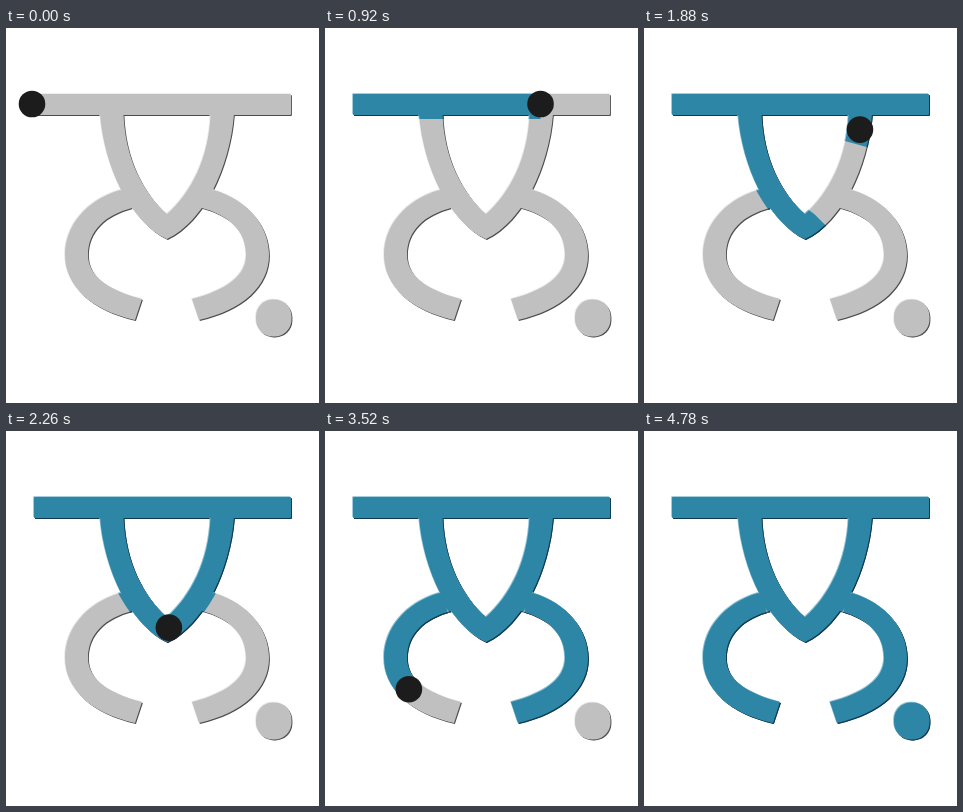
Animation, 313 px wide and 375 px high, one loop 4800 ms. Source, as an HTML page with a canvas:

```html
<!DOCTYPE html>
<html lang="en">
<head>
<meta charset="utf-8">
<title>Letter stroke order</title>
<style>
html, body { margin: 0; width: 100%; height: 100%; overflow: hidden; background: #fff; }
canvas { display: block; }
</style>
</head>
<body>
<canvas id="stage" width="313" height="375"></canvas>
<script>
const W = 313, H = 375, LOOP = 4800, STEP = 20;
const ctx = document.getElementById('stage').getContext('2d');

// The letter is symmetric about x = 161.
const mirror = d => d.replace(/([\d.]+),/g, (_, x) => (322 - x) + ',');

const stem = 'M94,86 C96,113 104,140 115,162 C126,183 143,203 161,211 L166,197 L161,186 C137,165 119,130 117.5,86 Z';
const lobe = 'M208,162 C242,172 263,198 263,227 C263,258 237,282 193,292 L186,271 ' +
             'C220,262 240,248 240,227 C240,203 223,187 196,180 L194,167 Z';
const shapes = [stem, mirror(stem), lobe, mirror(lobe)].map(d => new Path2D(d));
const bar = new Path2D();
bar.roundRect(28, 66, 257, 21, 1);
const dot = new Path2D();
dot.roundRect(250, 271.5, 35.5, 37, 17);
shapes.push(bar, dot);

// Centre lines; each ends with an extension (ext) that only the colour reaches.
const stemLine = 'M104.5,90 C108,130 132,177 161,198 L171.6,208.6';
const lobeLine = 'M202,171 C232,179 251.5,200 251.5,227 C251.5,253 230,273 184,284 L169.4,287.5';

function makeStroke(d, start, end, lead, ext) {
  const line = document.createElementNS('http://www.w3.org/2000/svg', 'path');
  line.setAttribute('d', d);
  const total = line.getTotalLength();
  return { line, path: new Path2D(d), start, end, lead, total, travel: total - ext };
}

const strokes = [
  makeStroke('M26,76 L286,76', 0, 1262, 0, 0),
  makeStroke(stemLine, 1372, 1800, 15, 15),
  makeStroke(mirror(stemLine), 1840, 2268, 15, 15),
  makeStroke(lobeLine, 2440, 3035, 16, 15),
  makeStroke(mirror(lobeLine), 3120, 3730, 6, 15)
];
const DOT = { x: 267.5, y: 290.5, start: 3800, end: 4300, hide: 4400 };

function makeLayer() {
  const canvas = document.createElement('canvas');
  canvas.width = W;
  canvas.height = H;
  return canvas.getContext('2d');
}

function embossed(light, dark, base) {
  const c = makeLayer();
  for (const [color, offset] of [[dark, 0.9], [light, -0.8], [base, 0]]) {
    c.setTransform(1, 0, 0, 1, offset, offset);
    c.fillStyle = color;
    shapes.forEach(s => c.fill(s));
  }
  return c.canvas;
}

const grayLetter = embossed('#e9e9e9', '#4c4c4c', '#c0c0c0');
const blueLetter = embossed('#8fc5d9', '#0c3a50', '#2e86a6');
const mask = makeLayer();

const progress = (t, s) => Math.min(1, Math.max(0, (t - s.start) / (s.end - s.start)));

function disc(c, x, y, r) {
  c.beginPath();
  c.arc(x, y, r, 0, Math.PI * 2);
  c.fill();
}

function drawMask(t) {
  mask.globalCompositeOperation = 'source-over';
  mask.clearRect(0, 0, W, H);
  mask.lineWidth = 30;
  for (const s of strokes) {
    const p = progress(t, s);
    if (p === 0) continue;
    const length = p === 1 ? s.total + 1 : Math.min(s.total, p * s.travel + s.lead);
    mask.setLineDash([length, 2000]);
    mask.stroke(s.path);
  }
  if (t >= DOT.start) disc(mask, DOT.x, DOT.y, 28 * progress(t, DOT));
  mask.globalCompositeOperation = 'source-in';
  mask.drawImage(blueLetter, 0, 0);
}

function ballPosition(t) {
  if (t >= DOT.hide) return null;
  if (t >= DOT.start) return DOT;
  const s = strokes.filter(k => k.start <= t).pop();
  return s.line.getPointAtLength(progress(t, s) * s.travel);
}

function draw(t) {
  ctx.fillStyle = '#fff';
  ctx.fillRect(0, 0, W, H);
  ctx.drawImage(grayLetter, 0, 0);
  drawMask(t);
  ctx.drawImage(mask.canvas, 0, 0);
  const ball = ballPosition(t);
  if (ball) {
    ctx.fillStyle = '#1c1c1c';
    disc(ctx, ball.x, ball.y, 13.3);
  }
}

let origin;
function tick(now) {
  origin ??= now;
  const t = (now - origin) % LOOP;
  draw(Math.floor(t / STEP) * STEP);
  requestAnimationFrame(tick);
}
draw(0);
requestAnimationFrame(tick);
</script>
</body>
</html>
```
